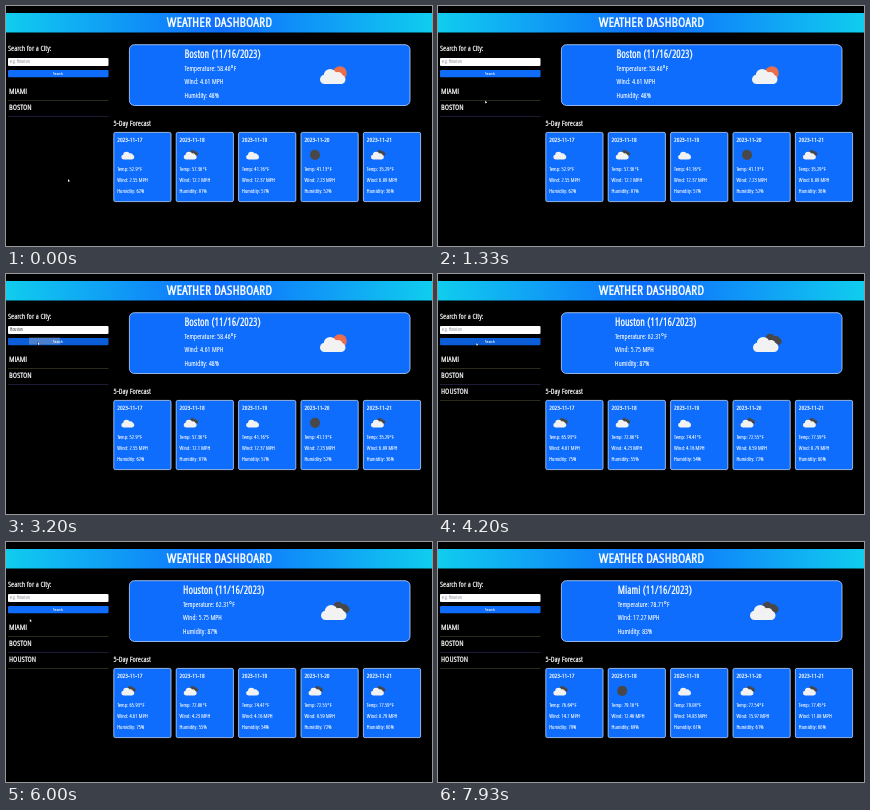
These frames come from a looping animation (426x240 px, 8000 ms). An HTML page with a canvas:

```html
<!DOCTYPE html>
<html lang="en">
<head>
<meta charset="utf-8">
<title>Weather Dashboard</title>
<style>
  html, body { margin: 0; width: 100%; height: 100%; overflow: hidden; background: #000; }
  canvas { display: block; width: 426px; height: 240px; }
</style>
</head>
<body>
<canvas></canvas>
<script>
const LOOP = 8000, BLUE = '#0f6dfd', HOVER = '#0b5ed7', DARK = '#484848', BORDER = '#b9d5ff';
const LOADED_HOUSTON = 3600, LOADED_MIAMI = 7200;

const canvas = document.querySelector('canvas');
const ctx = canvas.getContext('2d');
const dpr = window.devicePixelRatio || 1;
canvas.width = 426 * dpr;
canvas.height = 240 * dpr;
ctx.scale(dpr, dpr);

// Each forecast day: icon, temperature, wind, humidity.
const boston = {
  name: 'Boston', now: ['sunny', '58.46', '4.61', 48], textX: 178.5, iconX: 314,
  days: [['cloud', '52.9', '2.55', 62], ['broken', '57.36', '12.1', 81], ['cloud', '41.16', '12.37', 57],
    ['night', '41.13', '7.23', 52], ['broken', '35.29', '6.89', 36]]
};
const houston = {
  name: 'Houston', now: ['broken', '62.31', '5.75', 87], textX: 177, iconX: 315,
  days: [['broken', '65.93', '4.61', 75], ['broken', '72.86', '4.23', 55], ['cloud', '74.41', '4.16', 54],
    ['broken', '72.55', '8.59', 72], ['broken', '77.59', '8.79', 60]]
};
const miami = {
  name: 'Miami', now: ['broken', '78.71', '17.27', 83], textX: 179.7, iconX: 312,
  days: [['broken', '76.64', '14.7', 79], ['night', '79.16', '12.46', 69], ['cloud', '78.08', '14.83', 61],
    ['broken', '77.54', '15.97', 61], ['broken', '77.45', '11.88', 60]]
};

// Picks the narrowest installed face and tracks it like a tall condensed headline face.
const faces = ['Noto Sans', 'Open Sans Condensed Light', 'Open Sans Condensed', 'Open Sans',
  'Roboto Condensed', 'Roboto'];

function setFont(style) {
  ctx.font = `${style.weight} extra-condensed ${style.size}px "${style.face}", sans-serif`;
  ctx.fontStretch = 'extra-condensed';
  ctx.letterSpacing = `${style.tracking}px`;
}

function makeStyle(weight, sample, width, stroke) {
  const measure = (face, w = weight) => {
    setFont({ weight: w, face, size: 114, tracking: 0 });
    return ctx.measureText(sample).width;
  };
  // A face that only exists in bold measures the same at every weight.
  const usable = faces.filter(face => weight === 700 || measure(face) < measure(face, 700) * 0.99);
  const face = usable.reduce((a, b) => measure(b) < measure(a) ? b : a, usable[0] || 'Roboto');
  const natural = measure(face);
  const shrink = Math.max(0.93, Math.min(1, width / natural));
  return { weight, face, stroke, size: 114 * shrink, tracking: (width - natural * shrink) / sample.length };
}

const regular = makeStyle(300, 'Temperature: 58.46°F', 850, 3);
const bold = makeStyle(700, 'WEATHER DASHBOARD', 900, 2);

function text(str, x, y, size, style = regular, color = '#fff', align = 'left') {
  ctx.save();
  ctx.translate(x, y);
  ctx.scale(size / 100, size / 100);
  setFont(style);
  ctx.textAlign = align;
  ctx.fillStyle = ctx.strokeStyle = color;
  ctx.lineWidth = style.stroke;
  ctx.lineJoin = 'round';
  ctx.strokeText(str, 0, 0);
  ctx.fillText(str, 0, 0);
  ctx.restore();
}

function rect(x, y, w, h, color, radius = 0, border) {
  ctx.beginPath();
  ctx.roundRect(x, y, w, h, radius);
  ctx.fillStyle = color;
  ctx.fill();
  if (border) {
    ctx.strokeStyle = border;
    ctx.lineWidth = 0.8;
    ctx.stroke();
  }
}

function disc(x, y, r, color) {
  ctx.beginPath();
  ctx.arc(x, y, r, 0, Math.PI * 2);
  ctx.fillStyle = color;
  ctx.fill();
}

function cloud(x, bottom, w, color) {
  rect(x, bottom - w * 0.36, w, w * 0.36, color, w * 0.18);
  disc(x + w * 0.4, bottom - w * 0.34, w * 0.25, color);
  disc(x + w * 0.7, bottom - w * 0.27, w * 0.2, color);
}

function icon(kind, x, bottom, w) {
  if (kind === 'night') return disc(x + w * 0.5, bottom - w * 0.35, w * 0.39, DARK);
  if (kind === 'sunny') disc(x + w * 0.78, bottom - w * 0.43, w * 0.27, '#ec6e4c');
  if (kind === 'broken') cloud(x + w * 0.38, bottom - w * 0.28, w * 0.74, DARK);
  cloud(x, bottom, w, '#f2f2f2');
}

function readings([, temp, wind, humidity], label, x, y, step, size) {
  [`${label}: ${temp}°F`, `Wind: ${wind} MPH`, `Humidity: ${humidity}%`]
    .forEach((line, i) => text(line, x, y + i * step, size));
}

function header() {
  const gradient = ctx.createLinearGradient(0, 0, 426, 0);
  gradient.addColorStop(0, '#10cdee');
  gradient.addColorStop(0.5, BLUE);
  gradient.addColorStop(1, '#10cdee');
  rect(0, 7, 426, 19.5, gradient);
  text('WEATHER DASHBOARD', 213.5, 21.4, 11.7, bold, '#fff', 'center');
}

function sidebar(t) {
  const typed = t < LOADED_HOUSTON ? 'Houston'.slice(0, Math.max(0, Math.floor((t - 2050) / 100))) : '';
  const hover = t > 3000 && t < 5500;
  text('Search for a City:', 2, 45.3, 6.3, bold);
  rect(2, 52, 100.5, 8, '#fff', 1);
  text(typed || 'e.g. Houston', 4, 57.4, 4, regular, typed ? '#555' : '#959ba0');
  rect(2, 64, 100.5, 7.3, hover ? HOVER : BLUE, 1);
  if (t > 3050 && t < 3350) rect(23, 63.5, 31, 7, 'rgba(150,170,200,.45)');
  text('Search', 52, 69.2, 3.8, regular, '#fff', 'center');

  const cities = ['MIAMI', 'BOSTON'];
  if (t >= LOADED_HOUSTON) cities.push('HOUSTON');
  cities.forEach((city, i) => {
    text(city, 3, 88.4 + i * 16, 6.7, bold);
    rect(2, 94 + i * 16, 100.5, 0.8, i === 1 ? '#28264a' : '#3a3620');
  });
}

function weather(city) {
  rect(123.4, 38.7, 280.6, 60.8, BLUE, 5, BORDER);
  text(`${city.name} (11/16/2023)`, city.textX, 51.8, 8.8, bold);
  readings(city.now, 'Temperature', city.textX, 64.9, 13.4, 6.1);
  icon(city.now[0], city.iconX, 78, 25.5);

  text('5-Day Forecast', 107.5, 120, 6.3, bold);
  city.days.forEach((day, i) => {
    const x = 107.8 + i * 62.4;
    rect(x, 126.4, 57.2, 69.2, BLUE, 1.5, BORDER);
    text(`2023-11-${17 + i}`, x + 3.4, 135.8, 5.4, bold);
    icon(day[0], x + 7.5, 153.4, 13);
    readings(day, 'Temp', x + 3.4, 165.2, 11, 4.8);
  });
}

// Pointer stops: time, x, y.
const stops = [[900, 62, 173], [1600, 40, 56], [2780, 40, 56], [3150, 32, 68], [3700, 32, 68],
  [4400, 40, 69], [5450, 40, 69], [6500, 10, 84], [7500, 10, 84]];

function pointer(t) {
  if (t > 7500 || (t > 1700 && t < 2780)) return;
  const next = stops.findIndex(stop => stop[0] >= t);
  const [t1, x1, y1] = stops[next], [t0, x0, y0] = stops[Math.max(0, next - 1)];
  const p = t1 > t0 ? (t - t0) / (t1 - t0) : 0;
  const ease = p * p * (3 - 2 * p);
  ctx.save();
  ctx.translate(x0 + (x1 - x0) * ease, y0 + (y1 - y0) * ease);
  ctx.beginPath();
  ctx.moveTo(0, 0);
  ctx.lineTo(0, 3);
  ctx.lineTo(0.8, 2.4);
  ctx.lineTo(2, 2.2);
  ctx.closePath();
  ctx.strokeStyle = '#000';
  ctx.lineWidth = 0.6;
  ctx.stroke();
  ctx.fillStyle = '#fff';
  ctx.fill();
  ctx.restore();
}

function draw(now) {
  const t = now % LOOP;
  rect(0, 0, 426, 240, '#000');
  header();
  sidebar(t);
  weather(t < LOADED_HOUSTON ? boston : t < LOADED_MIAMI ? houston : miami);
  pointer(t);
}

const start = performance.now();
function tick() {
  draw(performance.now() - start);
  requestAnimationFrame(tick);
}
tick();
</script>
</body>
</html>
```
